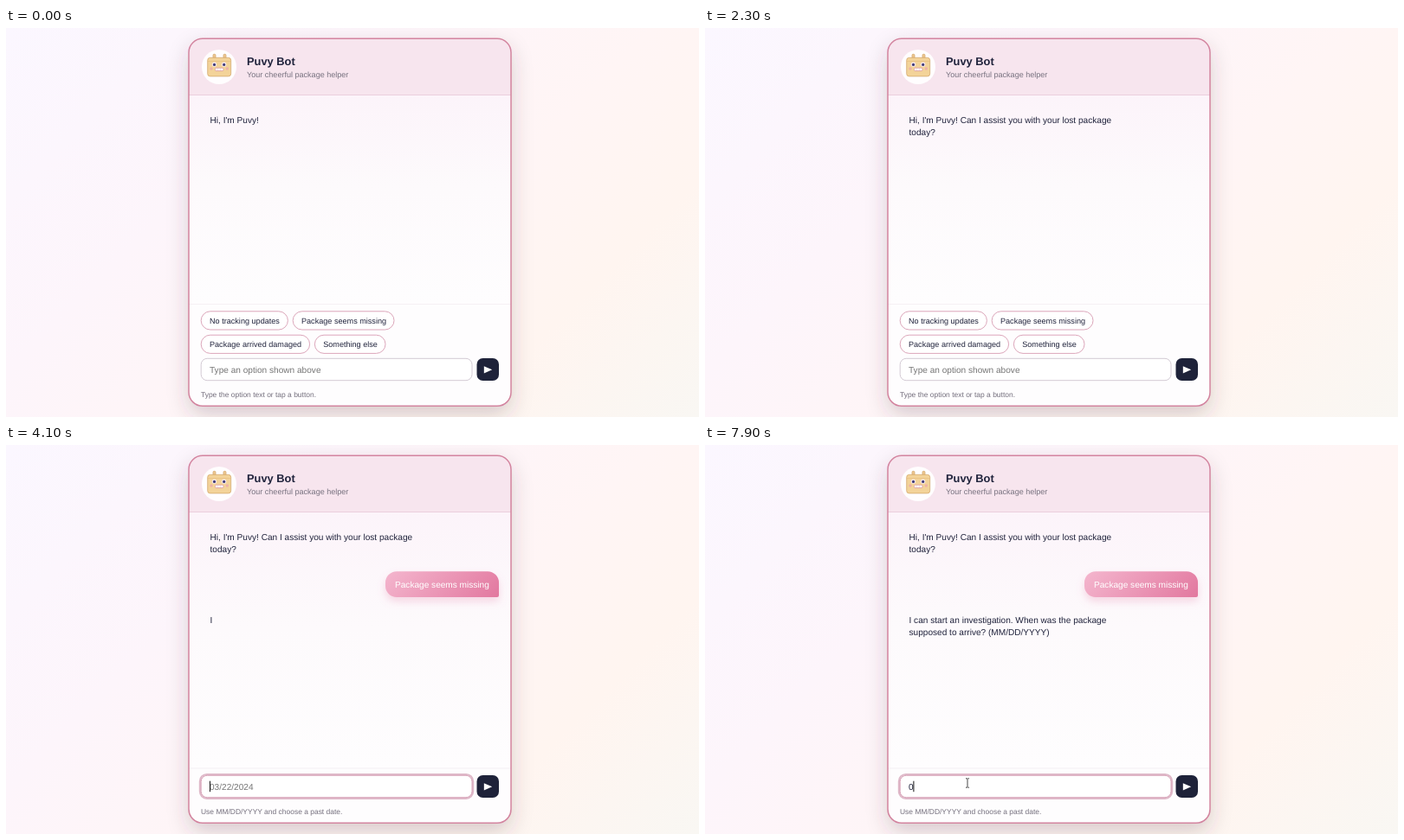
Recreate the animation shown at these times as an HTML page. Size 800x450 px, loop 8000 ms.

```html
<!DOCTYPE html>
<html lang="en">
<head>
<meta charset="utf-8">
<title>Package helper chat</title>
<style>
  html, body { margin: 0; width: 100%; height: 100%; overflow: hidden; }
  body { background: linear-gradient(135deg, #fbf7ff 0%, #fdf5fb 32%, #fff5f5 60%, #fff5f0 78%, #f9f7f3 100%); }
  svg { display: block; width: 800px; height: 450px; }
  text {
    font-family: "Liberation Sans", Arial, sans-serif;
    font-size: 10.1px; fill: #20233c; white-space: pre;
    text-rendering: geometricPrecision;
  }
  .title { font-size: 12.85px; font-weight: 700; }
  .sub { font-size: 9.05px; fill: #77717f; }
  .pill text { font-size: 9.1px; }
  .pill rect { stroke: #dca6ba; }
  .hint { font-size: 8.46px; fill: #736e7c; }
  .placeholder { fill: #757575; }
</style>
</head>
<body>
<svg viewBox="0 0 800 450">
  <defs>
    <linearGradient id="chatFill" x2="0" y2="1">
      <stop stop-color="#fcf4fa"/><stop offset=".45" stop-color="#fdfafc"/><stop offset="1" stop-color="#fefdfe"/>
    </linearGradient>
    <linearGradient id="bubbleFill" gradientUnits="userSpaceOnUse" x1="463" y1="121" x2="544" y2="201">
      <stop stop-color="#f4b6ce"/><stop offset="1" stop-color="#e2789f"/>
    </linearGradient>
    <filter id="cardShadow" x="-20%" y="-20%" width="140%" height="140%">
      <feDropShadow dx="0" dy="10" stdDeviation="12" flood-color="#4b3045" flood-opacity=".22"/>
    </filter>
    <filter id="bubbleShadow" x="-20%" y="-50%" width="140%" height="220%">
      <feDropShadow dx="0" dy="5" stdDeviation="5" flood-color="#e27ba3" flood-opacity=".28"/>
    </filter>
    <clipPath id="cardClip"><rect x="211" y="12.3" width="372" height="425" rx="16"/></clipPath>
  </defs>

  <rect x="211" y="12.3" width="372" height="425" rx="16" fill="#fefdfe" filter="url(#cardShadow)"/>
  <g clip-path="url(#cardClip)">
    <rect x="211" y="12" width="372" height="65.5" fill="#f7e5ee"/>
    <rect id="chat" x="211" y="77.5" width="372" fill="url(#chatFill)"/>
    <rect x="211" y="77" width="372" height="1" fill="#ebcfdd"/>
    <rect id="divider" x="211" width="372" height="1" fill="#f6f0f5"/>
  </g>
  <rect x="211" y="12.3" width="372" height="425" rx="16" fill="none" stroke="#d3849f" stroke-width="1.5"/>

  <g id="avatar">
    <circle cx="246" cy="45" r="20" fill="#fffdfe"/>
    <g fill="#efc891" stroke="#d0a468" stroke-width=".7">
      <rect x="239" y="30.3" width="3" height="6" rx="1.2"/>
      <rect x="251" y="30.3" width="3" height="6" rx="1.2"/>
      <rect x="232.7" y="34.3" width="27" height="21.6" rx="3" fill="#f3d399"/>
    </g>
    <path d="M233 38.5h26.4" stroke="#e6bd7c" stroke-width=".6"/>
    <g fill="#f6e9ee"><circle cx="240.5" cy="42.2" r="2.6"/><circle cx="251.7" cy="42.2" r="2.6"/></g>
    <g fill="#413b78"><circle cx="240.5" cy="42.4" r="1.6"/><circle cx="251.7" cy="42.4" r="1.6"/></g>
    <g fill="#eeb2a9"><circle cx="237" cy="47" r="1.7"/><circle cx="255.3" cy="47" r="1.7"/></g>
    <rect x="241.5" y="46.2" width="9.4" height="3.4" rx="1" fill="#fff" stroke="#d88f9c" stroke-width=".7"/>
    <path d="M244.6 46.4v3m3.1-3v3" stroke="#dfb4bd" stroke-width=".4"/>
  </g>
  <text class="title" x="278" y="43">Puvy Bot</text>
  <text class="sub" x="278" y="57">Your cheerful package helper</text>

  <text id="hello0" x="235.5" y="109.5"></text>
  <text id="hello1" x="235.5" y="123.5"></text>
  <g id="bubble">
    <path filter="url(#bubbleShadow)" fill="url(#bubbleFill)"
      d="M451 146.3H556a13 13 0 0 1 13 13V174a2 2 0 0 1-2 2H451a13 13 0 0 1-13-13V159.3a13 13 0 0 1 13-13z"/>
    <text x="449" y="165" style="fill:#fff">Package seems missing</text>
  </g>
  <text id="ask0" x="235.5" y="205.5"></text>
  <text id="ask1" x="235.5" y="219.5"></text>

  <g id="footer">
    <g id="pills"></g>
    <rect id="ring" x="223.9" y="381" width="315.2" height="27.8" rx="8" fill="none" stroke="#dfb9c9" stroke-width="2.2"/>
    <rect id="field" x="225.2" y="382.3" width="312.8" height="25.4" rx="7" fill="#fff"/>
    <text id="entry" x="235" y="399"></text>
    <rect id="caret" y="388.7" width="1" height="12.5" fill="#111"/>
    <rect x="543.5" y="382" width="25.5" height="26" rx="7" fill="#1e2239"/>
    <path d="M551.8 391.2L561.2 395.3L551.8 399.4z" fill="#fff"/>
    <text id="hint" class="hint" x="225" y="426.5"></text>
  </g>

  <g id="arrow"><path d="M0 0v11.5l2.7-2.5 1.8 4 1.8-.8-1.8-3.9h3.6z" fill="#111" stroke="#fff" stroke-width=".8"/></g>
  <g id="hand"><path d="M-1 1q1-1.6 2 0v4l5 1q1.5.5 1.3 2l-.6 3.5v1.5h-6v-1.3l-3.2-4q-.5-1.5 1.5-.7z" fill="#20202a" stroke="#eee" stroke-width=".6"/></g>
  <g id="beam"><path d="M-2-5.2h1.4l.6.6.6-.6H2M0-4.6v9.2M-2 5.2h1.4l.6-.6.6.6H2" fill="none" stroke="#333" stroke-width=".9"/></g>
</svg>
<script>
const LOOP = 8000, DROP = 3300, ASK = 3900, TYPE = 7700, WORD = 150;
const $ = id => document.getElementById(id);
const clamp = v => Math.max(0, Math.min(1, v));
const show = (id, on) => { $(id).style.display = on ? "" : "none"; };
const mix = (a, b, k) => `rgb(${a.map((v, i) => Math.round(v + (b[i] - v) * k))})`;
const INK = [32, 35, 60], WHITE = [255, 255, 255], ROSE = [212, 131, 159];

const HELLO = ["Hi, I'm Puvy! Can I assist you with your lost package", "today?"];
const QUESTION = ["I can start an investigation. When was the package", "supposed to arrive? (MM/DD/YYYY)"];

// label, x, y, width
const PILLS = [
  ["No tracking updates", 225.2, 327.8, 100.2],
  ["Package seems missing", 331.2, 327.8, 116.8],
  ["Package arrived damaged", 225.2, 355.2, 125.4],
  ["Something else", 356.4, 355.2, 81.6]
];
$("pills").innerHTML = PILLS.map(([label, x, y, w]) =>
  `<g class="pill"><rect x="${x}" y="${y}" width="${w}" height="21.2" rx="10.6"/>` +
  `<text x="${x + 9.8}" y="${y + 13.8}">${label}</text></g>`).join("");
const pills = [...$("pills").children];

// time, x, y
const POINTER = [[2700, 112, 357], [2800, 176, 351], [2900, 250, 344], [3000, 322, 338], [3100, 364, 336], [3300, 379, 335.5], [3500, 381, 335]];
const BEAM = [[6300, 303, 385], [6500, 303, 386.5], [7000, 303, 391]];

function along(path, t) {
  let i = 1;
  while (i < path.length - 1 && path[i][0] < t) i++;
  const [a, b] = [path[i - 1], path[i]];
  const k = clamp((t - a[0]) / (b[0] - a[0]));
  return [a[1] + (b[1] - a[1]) * k, a[2] + (b[2] - a[2]) * k];
}

function speak(id, lines, count) {
  lines.forEach((line, i) => {
    const words = line.split(" ");
    $(id + i).textContent = words.slice(0, Math.max(0, count)).join(" ");
    count -= words.length;
  });
}

function place(id, [x, y], on) {
  show(id, on);
  $(id).setAttribute("transform", `translate(${x} ${y})`);
}

function hover(i, t) {
  if (i === 0) return clamp(Math.min((t - 2870) / 180, 0.61 - (t - 2980) / 300));
  return i === 1 ? clamp((t - 2980) / 180) : 0;
}

function render(t) {
  const asking = t >= ASK, sent = t >= DROP, typed = t >= TYPE;
  const shift = sent && !asking ? 4.5 : 0;
  const top = asking ? 373.5 : 319 + shift;

  $("chat").setAttribute("height", top - 77.5);
  $("divider").setAttribute("y", top);
  $("footer").setAttribute("transform", `translate(0 ${shift})`);

  speak("hello", HELLO, 3 + Math.floor((t + 50) / WORD));
  speak("ask", QUESTION, Math.floor((t - ASK - 50) / WORD));

  const enter = clamp((t - DROP) / 180);
  $("bubble").style.opacity = enter;
  $("bubble").setAttribute("transform", `translate(0 ${4 * (1 - enter) ** 2})`);

  show("pills", !asking);
  pills.forEach((pill, i) => {
    const k = hover(i, t);
    pill.children[0].style.fill = mix(WHITE, ROSE, k);
    pill.children[1].style.fill = mix(INK, WHITE, k);
  });

  show("ring", asking);
  $("field").setAttribute("stroke", asking ? "#d8a3b8" : "#d3cad4");
  $("entry").textContent = typed ? "0" : asking ? "03/22/2024" : "Type an option shown above";
  $("entry").setAttribute("class", typed ? "" : "placeholder");
  show("caret", asking && (t - (typed ? TYPE : ASK + 20)) % 1060 < 530);
  $("caret").setAttribute("x", typed ? 240.4 : 235);
  $("hint").textContent = asking ? "Use MM/DD/YYYY and choose a past date."
    : sent ? "" : "Type the option text or tap a button.";

  const spot = along(POINTER, t), moving = t >= 2700 && !asking;
  const onPill = spot[0] > 225;
  place("arrow", spot, moving && !onPill);
  place("hand", spot, moving && onPill);
  place("beam", along(BEAM, t), t >= 6300);
}

const start = performance.now();
function tick() {
  render((performance.now() - start) % LOOP);
  requestAnimationFrame(tick);
}
tick();
</script>
</body>
</html>
```
